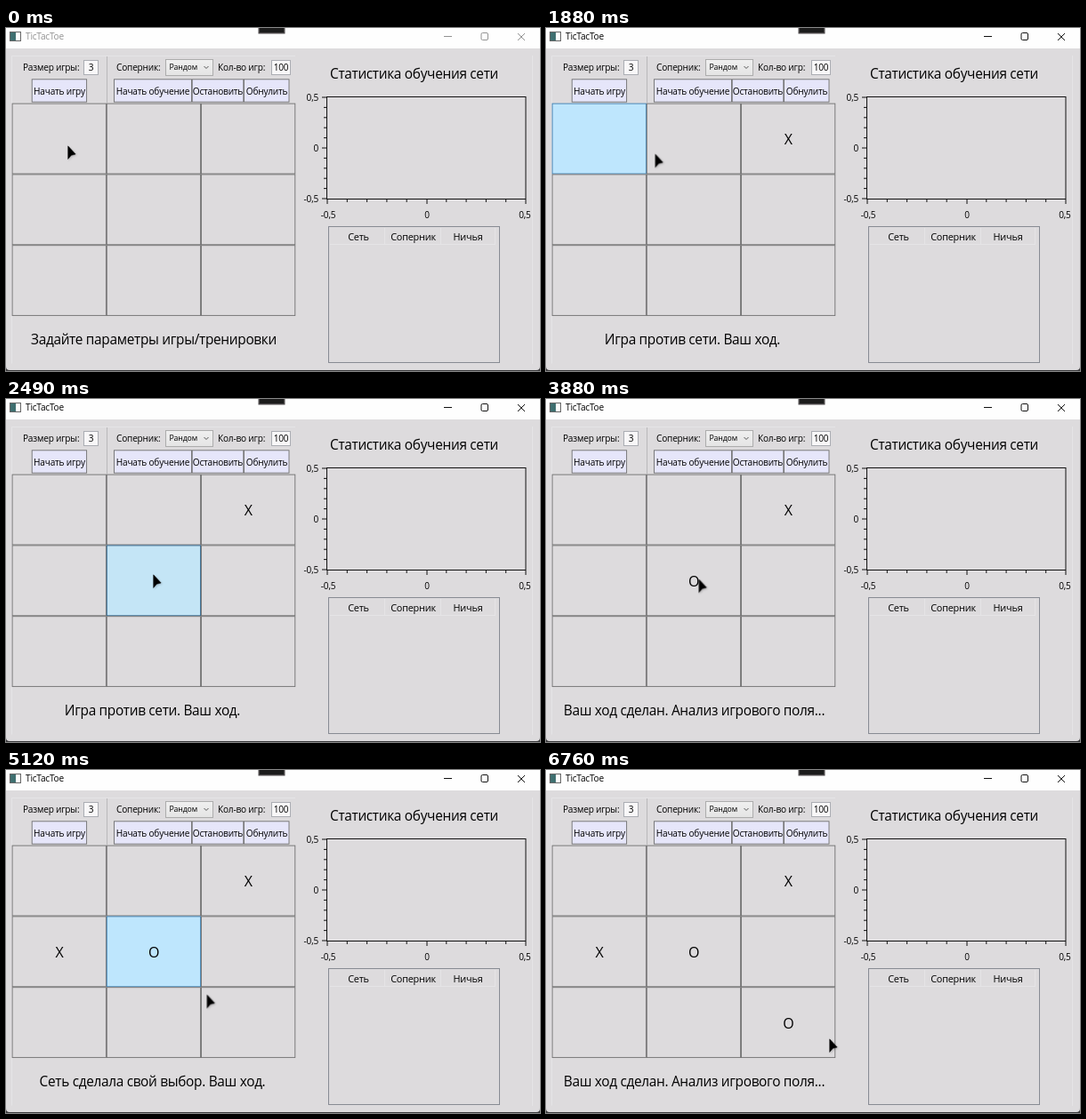
Animation, 600 px wide and 386 px high, one loop 7 s. Source, as an HTML page:

```html
<!DOCTYPE html>
<html lang="ru">
<head>
<meta charset="utf-8">
<title>TicTacToe</title>
<style>
html, body { margin: 0; width: 100%; height: 100%; overflow: hidden; background: #dddbdd; }
svg { display: block; width: 600px; height: 386px; }

text { font: 10.1px "Open Sans", "Noto Sans", sans-serif; letter-spacing: -.02em; fill: #000; }
.mid { text-anchor: middle; }
.end { text-anchor: end; }
.big text { font-size: 15.4px; text-anchor: middle; }
.mark { font-size: 16px; text-anchor: middle; }
.head text { font-size: 10.9px; text-anchor: middle; }
.small { font-size: 8.8px; }

.btn rect { fill: #e6e6fa; stroke: #707070; stroke-width: .9; }
.cells rect { width: 105.3px; height: 78.9px; fill: #dddbdd; stroke: #707070; stroke-width: .9; }
.field { fill: #f8f7f8; stroke: #abadb3; }
.line { fill: none; stroke: #111; }
.faint { fill: none; stroke: #e5e4e6; }

/* Hard state changes share one 7 s clock */
.t { animation: 7s step-end infinite; }
.cells .t, .btn .t { --hover: #bee6fd; --press: #c4e5f6; --hoverLine: #3c7fb1; --pressLine: #2c628b; }

.caption text { animation-name: activeText; }
.caption path { fill: none; animation-name: activeIcon; }
@keyframes activeText { 0% { fill: #929292; } 10.4%, 100% { fill: #000; } }
@keyframes activeIcon { 0% { stroke: #929292; } 10.4%, 100% { stroke: #111; } }

#start { animation-name: start; }
@keyframes start {
  0%, 26%, 100% { fill: #e6e6fa; stroke: #707070; }
  4.4%, 13% { fill: var(--hover); stroke: var(--hoverLine); }
  10.8% { fill: var(--press); stroke: var(--pressLine); }
}
#cell0 { animation-name: cell0; }
@keyframes cell0 {
  0%, 27.25%, 100% { fill: #dddbdd; stroke: #707070; }
  26.4% { fill: var(--hover); stroke: var(--hoverLine); }
}
#cell1 { animation-name: cell1; }
@keyframes cell1 {
  0%, 28.1%, 100% { fill: #dddbdd; stroke: #707070; }
  27.25% { fill: var(--hover); stroke: var(--hoverLine); }
}
#cell4 { animation-name: cell4; }
@keyframes cell4 {
  0%, 38.1%, 73.5%, 100% { fill: #dddbdd; stroke: #707070; }
  28.1%, 60.55% { fill: var(--hover); stroke: var(--hoverLine); }
  35.55% { fill: var(--press); stroke: var(--pressLine); }
}
#cell8 { animation-name: cell8; }
@keyframes cell8 {
  0%, 84.4%, 100% { fill: #dddbdd; stroke: #707070; }
  73.5% { fill: var(--hover); stroke: var(--hoverLine); }
  80.95% { fill: var(--press); stroke: var(--pressLine); }
}

#x2 { animation-name: fromStart; }
#o4 { animation-name: fromMove1; }
#x3 { animation-name: fromReply; }
#o8 { animation-name: fromMove2; }
@keyframes fromStart { 0% { opacity: 0; } 13.4%, 100% { opacity: 1; } }
@keyframes fromMove1 { 0% { opacity: 0; } 38.1%, 100% { opacity: 1; } }
@keyframes fromReply { 0% { opacity: 0; } 60.55%, 100% { opacity: 1; } }
@keyframes fromMove2 { 0% { opacity: 0; } 84.4%, 100% { opacity: 1; } }

#setup { animation-name: setup; }
#begin { animation-name: begin; }
#wait { animation-name: wait; }
#reply { animation-name: reply; }
@keyframes setup { 0% { opacity: 1; } 13.4%, 100% { opacity: 0; } }
@keyframes begin { 0%, 38.1%, 100% { opacity: 0; } 13.4% { opacity: 1; } }
@keyframes wait { 0%, 60.55% { opacity: 0; } 38.1%, 84.4%, 100% { opacity: 1; } }
@keyframes reply { 0%, 84.4%, 100% { opacity: 0; } 60.55% { opacity: 1; } }

#cursor { animation: move 7s linear infinite; filter: drop-shadow(1px 1px 1px rgba(0, 0, 0, .2)); }
@keyframes move {
  0% { transform: translate(69px, 131px); }
  .4% { transform: translate(69px, 131px); animation-timing-function: ease-in-out; }
  7.4%, 25.2% { transform: translate(57px, 72px); }
  26% { transform: translate(79px, 95px); }
  26.86% { transform: translate(122px, 140px); animation-timing-function: ease-out; }
  31.1%, 55% { transform: translate(165px, 196px); }
  55.43% { transform: translate(171px, 201px); animation-timing-function: ease-out; }
  58%, 71.4% { transform: translate(197px, 228px); }
  73.14% { transform: translate(225px, 251px); animation-timing-function: ease-out; }
  76.5% { transform: translate(260px, 289px); }
  92.3% { transform: translate(260px, 289px); animation-timing-function: ease-in-out; }
  96.55%, 100% { transform: translate(318px, 301px); }
}
</style>
</head>
<body>
<svg viewBox="0 0 600 386">
  <defs>
    <linearGradient id="combo" x2="0" y2="1">
      <stop stop-color="#f0f0f0"/><stop offset="1" stop-color="#e4e4e4"/>
    </linearGradient>
  </defs>
  <rect width="600" height="386" fill="#dddbdd"/>

  <!-- Window frame -->
  <rect width="600" height="23" fill="#fefefe"/>
  <g class="caption">
    <rect x="4.5" y="4.5" width="12" height="10" fill="#fff" stroke="#666"/>
    <rect x="5" y="5" width="6" height="9" fill="#3f6f70"/>
    <text class="t" x="22" y="13.2">TicTacToe</text>
    <path class="t" d="M492 9.5h9M535.5 5.5h4.500q1.500 0 1.500 1.500v5q0 1.500-1.500 1.500h-4.500q-1.500 0-1.500-1.500v-5q0-1.500 1.500-1.500zM575 6l8 8m0-8l-8 8"/>
  </g>
  <path d="M283.500 0h30v6.500h-30z" fill="#4a4648"/>
  <path d="M285 0h27v5h-27z" fill="#1b1b1b"/>
  <path d="M0 381q0 4 4 4h592q4 0 4-4v5H0z" fill="#3a3a3c"/>
  <path class="faint" d="M6.500 377.500V31.500H325M591.500 31v347"/>
  <path d="M113.500 32v52" stroke="#b9b8ba"/>

  <!-- Settings -->
  <text x="19" y="47.500">Размер игры:</text>
  <rect class="field" x="87.500" y="36.500" width="16" height="16"/>
  <text class="mid" x="95.500" y="48">3</text>
  <text x="124" y="47.500">Соперник:</text>
  <rect x="179.500" y="35.500" width="53" height="18" fill="url(#combo)" stroke="#acacac"/>
  <text class="small" x="183.500" y="47">Рандом</text>
  <path d="M222.500 43l2.500 2.500 2.500-2.500" fill="none" stroke="#555"/>
  <text x="238" y="47.500">Кол-во игр:</text>
  <rect class="field" x="298.500" y="36.500" width="21" height="16"/>
  <text class="mid" x="309" y="48">100</text>

  <g class="btn mid">
    <rect id="start" class="t" x="29.200" y="57.800" width="61.400" height="25.400"/>
    <rect x="121.500" y="57.800" width="87" height="25.400"/>
    <rect x="209.200" y="57.800" width="57.600" height="25.400"/>
    <rect x="267.500" y="57.800" width="50.500" height="25.400"/>
    <text x="60" y="75">Начать игру</text>
    <text x="165" y="75">Начать обучение</text>
    <text x="238" y="75">Остановить</text>
    <text x="293" y="75">Обнулить</text>
  </g>

  <!-- Board -->
  <g class="cells">
    <rect id="cell0" class="t" x="7.100" y="85.100"/>
    <rect id="cell1" class="t" x="113.300" y="85.100"/>
    <rect x="219.500" y="85.100"/>
    <rect x="7.100" y="164.900"/>
    <rect id="cell4" class="t" x="113.300" y="164.900"/>
    <rect x="219.500" y="164.900"/>
    <rect x="7.100" y="244.700"/>
    <rect x="113.300" y="244.700"/>
    <rect id="cell8" class="t" x="219.500" y="244.700"/>
  </g>
  <text id="x2" class="mark t" x="272.300" y="131">X</text>
  <text id="x3" class="mark t" x="60" y="210.500">X</text>
  <text id="o4" class="mark t" x="166.200" y="210.500">O</text>
  <text id="o8" class="mark t" x="272.300" y="290.500">O</text>

  <!-- Status and heading -->
  <g class="big">
    <text id="setup" class="t" x="166" y="356">Задайте параметры игры/тренировки</text>
    <text id="begin" class="t" x="164.500" y="356">Игра против сети. Ваш ход.</text>
    <text id="wait" class="t" x="166.500" y="356">Ваш ход сделан. Анализ игрового поля...</text>
    <text id="reply" class="t" x="164.500" y="356">Сеть сделала свой выбор. Ваш ход.</text>
    <text x="458.500" y="57">Статистика обучения сети</text>
  </g>

  <!-- Chart -->
  <rect class="line" x="360.500" y="77.500" width="223.500" height="115"/>
  <path class="line" d="M355 78h5m-5 57h5m-5 57h5M361 193v5m112-5v5m111-5v5"/>
  <path class="line" d="M357 89.400h3m-3 11.400h3m-3 11.400h3m-3 11.400h3m-3 22.800h3m-3 11.400h3m-3 11.400h3m-3 11.400h3M383.300 193v3m22.300-3v3m22.300-3v3m22.300-3v3m44.600-3v3m22.300-3v3m22.300-3v3m22.300-3v3"/>
  <g class="end">
    <text x="351" y="82">0,5</text>
    <text x="351" y="138.500">0</text>
    <text x="351" y="195.500">-0,5</text>
  </g>
  <g class="mid">
    <text x="362" y="213.500">-0,5</text>
    <text x="473" y="213.500">0</text>
    <text x="583" y="213.500">0,5</text>
  </g>

  <!-- Results table -->
  <rect x="362.500" y="223.500" width="192" height="153" fill="none" stroke="#878b93"/>
  <path class="faint" d="M425.500 225v18m63-18v18m61-18v18M364 243.500h186"/>
  <g class="head">
    <text x="396" y="239">Сеть</text>
    <text x="457.500" y="239">Соперник</text>
    <text x="519" y="239">Ничья</text>
  </g>

  <path id="cursor" d="M.700 1.800V16.500L4.300 12.300 9.200 11z" fill="#000" stroke="#000" stroke-width=".5" stroke-linejoin="round"/>
</svg>
</body>
</html>
```
